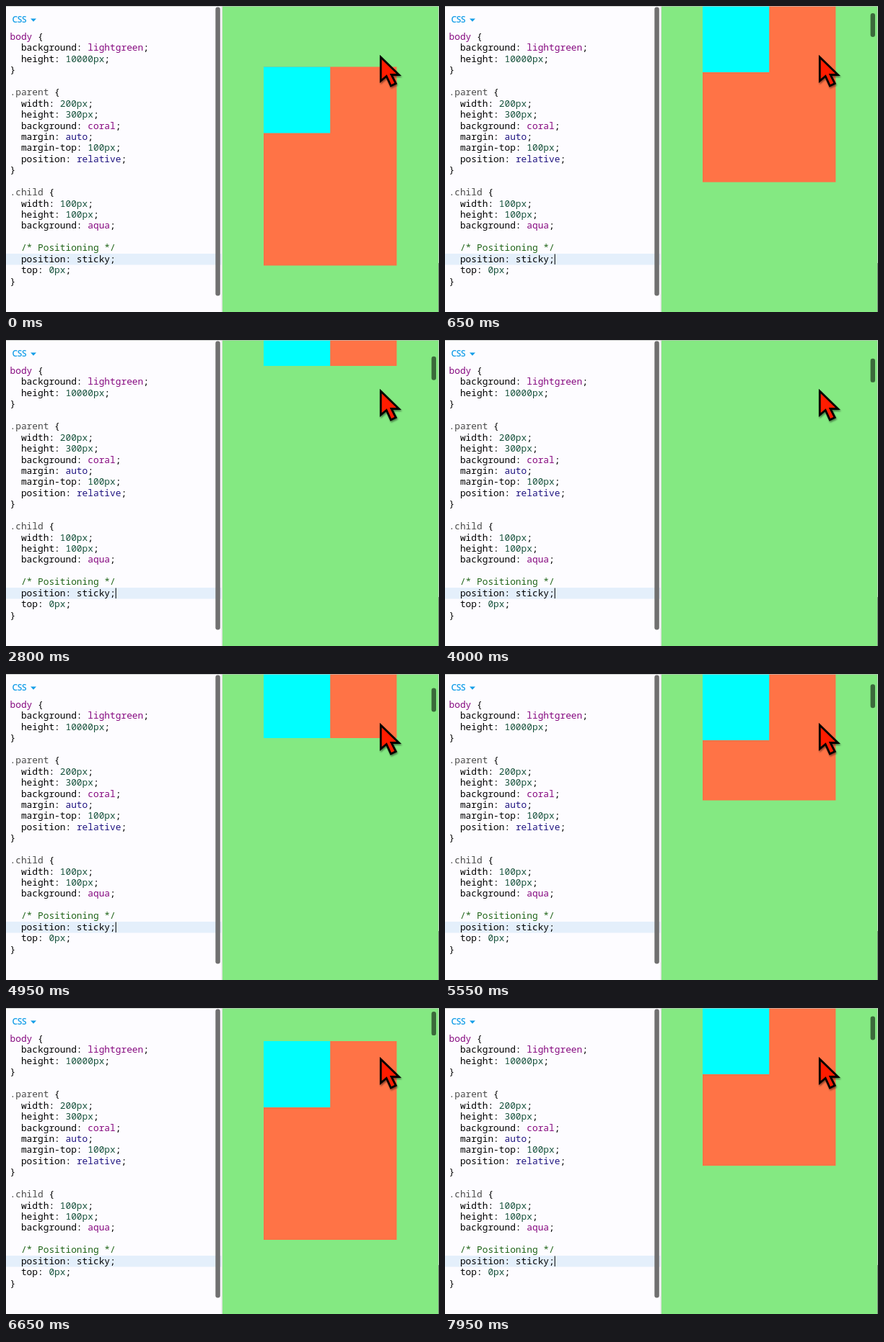
An HTML page for the animation above (8000 ms loop, 600 by 425 pixels).

```html
<!DOCTYPE html>
<html lang="en">
<head>
<meta charset="utf-8">
<title>Sticky positioning</title>
<style>
  html, body { margin: 0; width: 100%; height: 100%; overflow: hidden; background: #fdfcff; }
  svg { display: block; width: 100vw; height: 100vh; }
  .code { font: 500 12.83px "Noto Sans Mono", "DejaVu Sans Mono", monospace; white-space: pre; fill: #000; }
  .tag, .atom { fill: #85087f; }
  .class { fill: #4a4a4a; }
  .num { fill: #17523c; }
  .key { fill: #1f1480; }
  .note { fill: #1f6418; }
  .label { font: 600 12px "Open Sans", "Noto Sans", sans-serif; letter-spacing: -.4px; fill: #159ee8; }
</style>
</head>
<body>
<svg viewBox="0 0 600 425" preserveAspectRatio="none">
  <defs>
    <filter id="shadow" x="-30%" y="-30%" width="180%" height="180%">
      <feDropShadow dx="1" dy="2" stdDeviation="1.3" flood-color="#000" flood-opacity=".45"/>
    </filter>
  </defs>

  <rect width="300" height="425" fill="#fdfcff"/>
  <rect y="344" width="298.5" height="15.5" fill="#e4effb"/>
  <text class="label" x="8.5" y="23">CSS</text>
  <path d="M34 17.5h8l-4 4.3z" fill="#159ee8"/>
  <g id="code" class="code"></g>
  <rect id="caret" x="151.7" y="344.5" width="1.1" height="14.5" fill="#111"/>
  <rect x="298.5" width="1.5" height="425" fill="#dde3dd"/>
  <rect x="290.3" y="1.5" width="6.5" height="401" rx="3.2" fill="#707070"/>

  <rect x="300" width="300" height="425" fill="#84e982"/>
  <rect id="parent" x="357" width="184.4" height="276" fill="#ff7346"/>
  <rect id="child" x="357" width="92.2" height="92" fill="#00ffff"/>
  <rect id="thumb" x="589.6" width="6.4" height="33" rx="3.2" fill="#3b693b"/>
  <path d="M599.5 0V357" stroke="#c0d6c0"/>
  <path d="M599.5 357V425" stroke="#7c847c"/>
  <path d="M0 .4H600" stroke="#b9bcb9" stroke-width=".8"/>
  <path d="M519.3 71V104L527.2 97.5L533.3 110.9L540.2 107.6L534 95.5H544.5Z"
        fill="#ff1a00" stroke="#050505" stroke-width="2.8" filter="url(#shadow)"/>
</svg>
<script>
const LOOP = 8000, STEP = 50, BLINK = 530;
const $ = id => document.getElementById(id);

const source = `body {
  background: lightgreen;
  height: 10000px;
}

.parent {
  width: 200px;
  height: 300px;
  background: coral;
  margin: auto;
  margin-top: 100px;
  position: relative;
}

.child {
  width: 100px;
  height: 100px;
  background: aqua;

  /* Positioning */
  position: sticky;
  top: 0px;
}`;

const rules = [
  ["note", /\/\*.*\*\//],
  ["tag", /^body/],
  ["class", /^\.\w+/],
  ["num", /\b\d+px/],
  ["atom", /lightgreen|coral|aqua/],
  ["key", /\bauto|relative/]
];

function highlight(line) {
  for (const [name, re] of rules) {
    if (re.test(line)) return line.replace(re, `<tspan class="${name}">$&</tspan>`);
  }
  return line;
}

$("code").innerHTML = source.split("\n")
  .map((line, i) => `<text x="5.5" y="${47 + i * 15.44}" xml:space="preserve">${highlight(line)}</text>`)
  .join("");

// Scroll offset over time: [ms, px]
const keys = [
  [0, 0], [850, 150], [1500, 252.5], [1800, 278], [2800, 324.5], [3450, 362], [3850, 376],
  [4250, 362], [4950, 271.5], [5550, 185], [6150, 101.5], [6650, 38.5], [7000, 2],
  [7700, 99], [8000, 150]
];
const slope = i => (keys[i + 1][1] - keys[i][1]) / (keys[i + 1][0] - keys[i][0]);

// Tangent that never overshoots its neighbours
function tangent(i) {
  if (i === 0) return slope(0);
  if (i === keys.length - 1) return slope(i - 1);
  const a = slope(i - 1), b = slope(i);
  return a * b <= 0 ? 0 : 2 * a * b / (a + b);
}

function scrollAt(t) {
  let i = 0;
  while (i < keys.length - 2 && t >= keys[i + 1][0]) i++;
  const [t0, a] = keys[i], [t1, b] = keys[i + 1];
  const d = t1 - t0, u = (t - t0) / d, v = 1 - u;
  return v * v * (1 + 2 * u) * a + u * u * (3 - 2 * u) * b
    + d * u * v * (v * tangent(i) - u * tangent(i + 1));
}

function draw(t) {
  const scroll = scrollAt(t), top = 84.5 - scroll;
  $("parent").setAttribute("y", top);
  $("child").setAttribute("y", Math.min(Math.max(top, 0), top + 184));
  $("thumb").setAttribute("y", 2.7 + scroll * .062);
  $("thumb").setAttribute("opacity", t < STEP ? 0 : 1);
  const phase = (t + 2 * BLINK - 380) % (2 * BLINK);
  $("caret").setAttribute("opacity", phase < BLINK ? 1 : 0);
}

const start = performance.now();
function frame() {
  const t = (performance.now() - start) % LOOP;
  draw(Math.floor(t / STEP) * STEP);
  requestAnimationFrame(frame);
}
frame();
</script>
</body>
</html>
```
